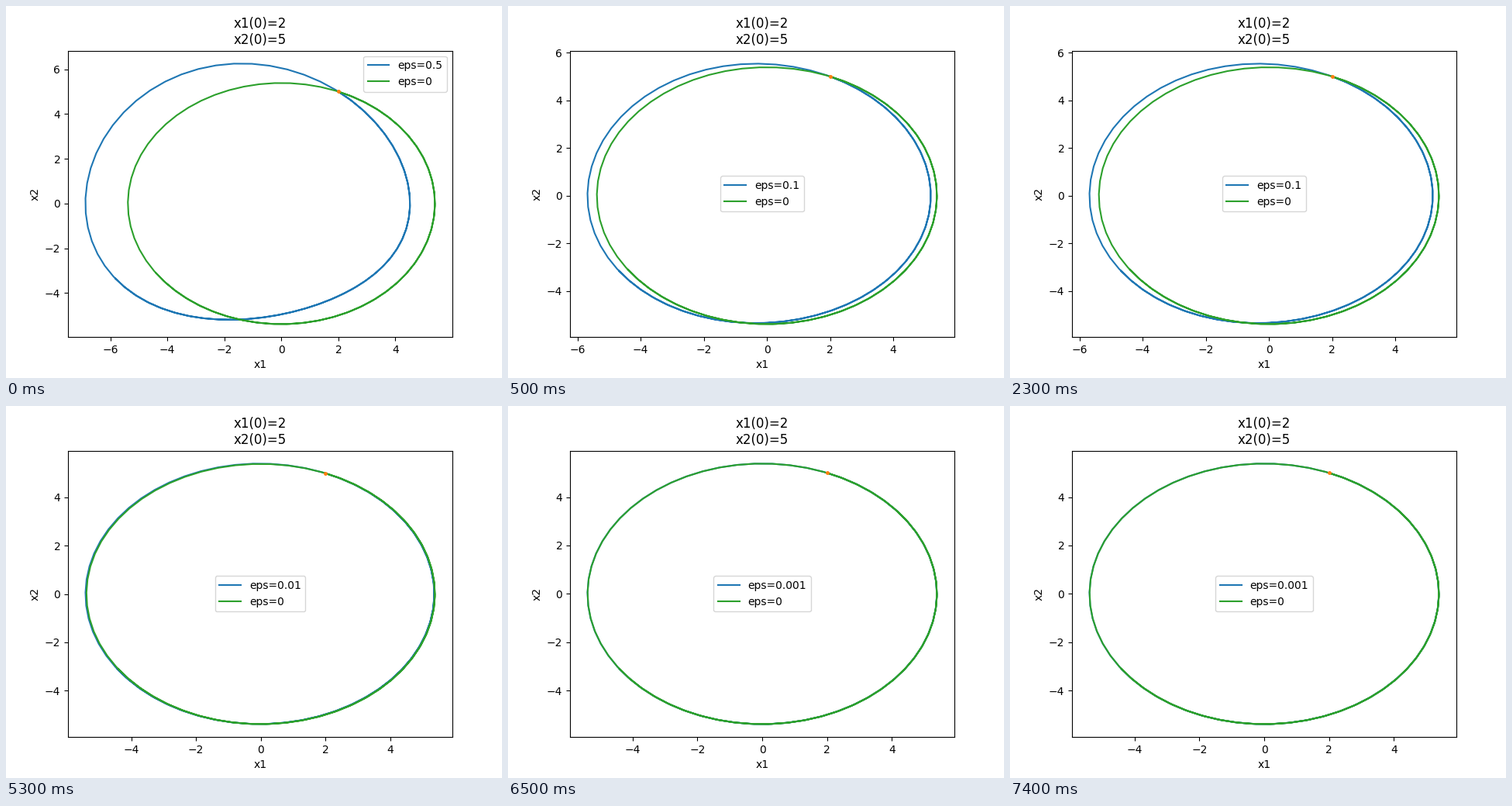
A matplotlib script that plays this animation: 640x480 px, repeating every 8000 ms.

```python
import numpy as np
import matplotlib.pyplot as plt
from matplotlib.animation import FuncAnimation

STEP = 500                      # ms per animation frame
X1, X2 = 2, 5                   # initial state
SCHEDULE = [(0.5, 1), (0.1, 6), (0.01, 6), (0.001, 3)]
EPS = [eps for eps, count in SCHEDULE for _ in range(count)]

t = np.linspace(0, 10, 100)


def solve(eps):
    """Solution of x'' + x = -4 eps cos(t)^2 with x(0) = X1, x'(0) = X2."""
    c, s = np.cos(t), np.sin(t)
    shift = -2 + 2 / 3 * np.cos(2 * t) + 4 / 3 * c
    rate = -4 / 3 * (np.sin(2 * t) + s)
    return X1 * c + X2 * s + eps * shift, X2 * c - X1 * s + eps * rate


fig, ax = plt.subplots(figsize=(6.4, 4.8), dpi=100)


def draw(i):
    eps = EPS[i]
    ax.clear()
    ax.plot(*solve(eps), color="tab:blue", label=f"eps={eps}")
    ax.plot(*solve(0), color="tab:green", label="eps=0")
    ax.plot(X1, X2, ".", color="tab:orange", markersize=5)
    ax.set_title(f"x1(0)={X1}\nx2(0)={X2}")
    ax.set_xlabel("x1")
    ax.set_ylabel("x2")
    ax.legend(loc="upper right" if eps == 0.5 else "center")
    return []


anim = FuncAnimation(fig, draw, frames=len(EPS), init_func=lambda: draw(0),
                     interval=STEP, repeat=True, repeat_delay=0)
plt.show()
```
